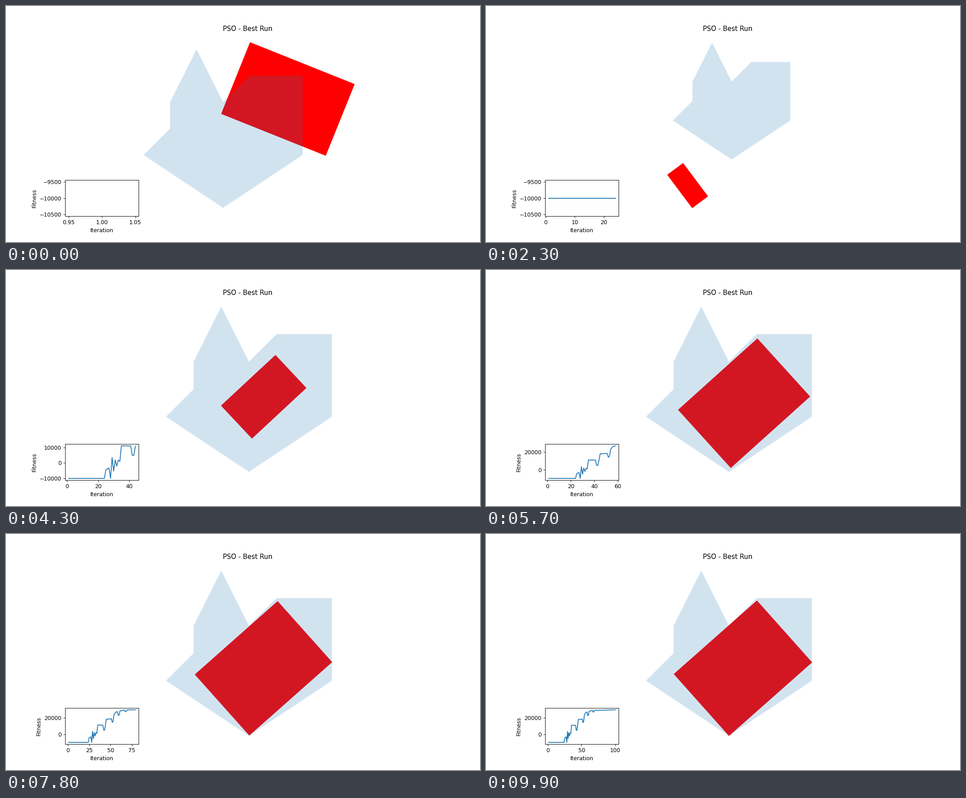
Write a matplotlib script that moves like this. It is 1058x529 px and loops after 10 s.

```python
import numpy as np
import matplotlib.pyplot as plt
from matplotlib.animation import FuncAnimation
from matplotlib.patches import Polygon

W, H = 1058, 529
STEPS = 100
CELL = 50          # one outline unit in fitness lengths
PENALTY = -10000

plt.rcParams["font.family"] = "DejaVu Sans"
# The tiny surplus keeps the pixel size from rounding down.
fig = plt.figure(figsize=(12.0001, 6.0001), dpi=W / 12, facecolor="white")
LEFT, BOTTOM, WIDTH, HEIGHT = 0.125, 0.11, 0.775, 0.77
ax = fig.add_axes([LEFT, BOTTOM, WIDTH, HEIGHT])
ax.axis("off")
chart = fig.add_axes([LEFT, BOTTOM, WIDTH / 5, 0.152])
fig.text(484 / W, 473 / H, "PSO - Best Run", fontsize=12)

OUTLINE = np.array([(0, 0), (3, 2), (3, 5), (1, 5), (0, 4),
                    (-1, 6), (-2, 4), (-2, 3), (-3, 2)], float)

# Key poses: iteration, centre x, y, width, height, angle
POSES = np.array([
    (23, 2.445, 4.120, 4.233, 2.904, -21.9),
    (24, -2.249, -1.343, 2.110, 0.986, -53.3),
    (32, -2.927, 1.735, 0.780, 0.295, 45.4),
    (35, 0.534, 2.724, 2.675, 1.620, 43.05),
    (44, 0.534, 2.724, 2.675, 1.620, 43.05),
    (45, 1.070, 2.990, 2.400, 3.000, 41.6),
    (58, 0.548, 2.491, 3.847, 2.826, 42.1),
    (79, 0.526, 2.450, 3.992, 2.948, 41.65),
    (100, 0.507, 2.454, 4.004, 2.988, 41.6),
])

# Fitness trend: iteration, value
TREND = np.array([
    (24, PENALTY), (25, -4500), (34, 1000), (35, 11000), (44, 10850),
    (45, 18000), (51, 18500), (56, 26500), (58, 27200), (66, 29200),
    (79, 29420), (100, 29910),
])


def fitness_curve():
    steps = np.arange(1, STEPS + 1)
    curve = np.interp(steps, *TREND.T)
    # Damped swings while the search finds the outline
    for n in range(6):
        curve[27 + n] -= 7800 * (-0.7) ** n
    # Short setbacks that fade as the swarm settles
    for start, depth in ((42, 6000), (52, 6000), (59, 4700), (67, 2000)):
        curve[start - 1:start + 1] -= depth
    return np.maximum(curve, PENALTY)


FITNESS = fitness_curve()


def pose(step):
    cx, cy, w, h, angle = (np.interp(step, POSES[:, 0], col)
                           for col in POSES.T[1:])
    if step > 34:  # inside the outline the fitness is the area
        scale = np.sqrt(FITNESS[step - 1] / (w * h)) / CELL
        w, h = w * scale, h * scale
    return cx, cy, w, h, angle


def corners(cx, cy, w, h, angle):
    a = np.radians(angle)
    along = np.array([np.cos(a), np.sin(a)]) * w / 2
    across = np.array([-np.sin(a), np.cos(a)]) * h / 2
    return np.array([cx, cy]) + [along + across, along - across,
                                 -along - across, across - along]


rect = ax.add_patch(Polygon(OUTLINE[:4], facecolor="red", edgecolor="red",
                            linewidth=1))
ax.add_patch(Polygon(OUTLINE, facecolor="tab:blue", edgecolor="none",
                     alpha=0.2))


def fit_view(points):
    lo, hi = points.min(axis=0), points.max(axis=0)
    mid, half = (lo + hi) / 2, (hi - lo) * 0.55
    ratio = WIDTH * W / (HEIGHT * H)
    reach = max(half[1], half[0] / ratio)
    ax.set_xlim(mid[0] - reach * ratio, mid[0] + reach * ratio)
    ax.set_ylim(mid[1] - reach, mid[1] + reach)


def update(i):
    step = i + 1
    box = corners(*pose(step))
    rect.set_xy(box)
    fit_view(np.vstack([OUTLINE, box]))
    chart.clear()
    chart.plot(np.arange(1, step + 1), FITNESS[:step], color="tab:blue")
    chart.set_xlabel("Iteration")
    chart.set_ylabel("Fitness")
    return []


anim = FuncAnimation(fig, update, frames=STEPS, interval=100,
                     init_func=lambda: [], repeat=True, repeat_delay=0)
plt.show()
```
